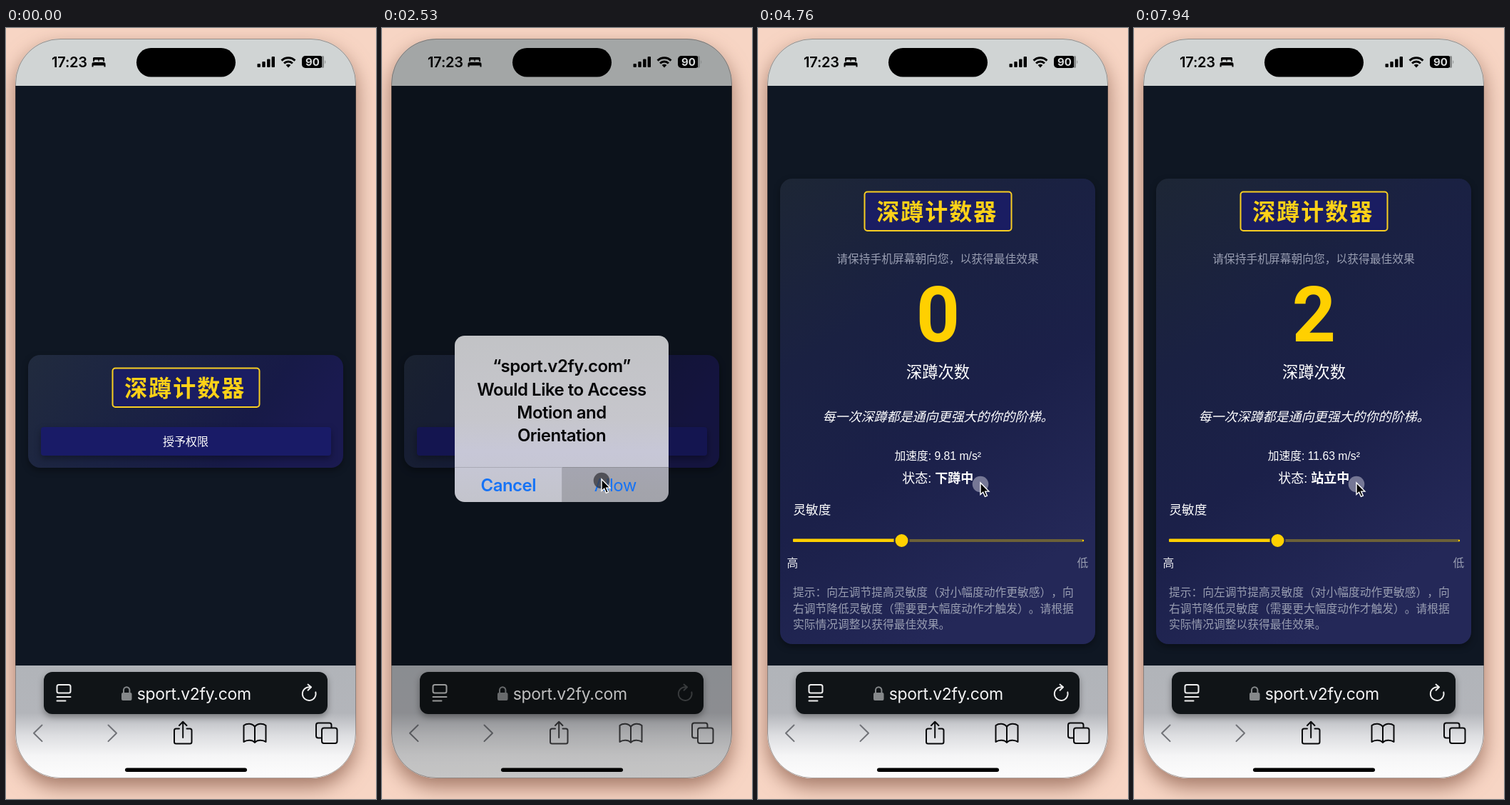
Write an HTML page that moves like this. It is 519 px wide and 1080 px high and loops after 8000 ms.

```html
<!DOCTYPE html>
<html lang="zh-CN">
<head>
<meta charset="utf-8">
<title>深蹲计数器</title>
<style>
  html, body { margin: 0; width: 100%; height: 100%; overflow: hidden; background: #f7d5c4; }
  svg { display: block; width: 100vw; height: 100vh; text-spacing-trim: space-all; }
  filter { color-interpolation-filters: sRGB; }
  text { font-family: "Liberation Sans", "Noto Sans CJK SC", "Noto Sans CJK", sans-serif; fill: #fff; font-size: 15.75px; }
  .ui { font-family: Inter, sans-serif; }
  .mid { text-anchor: middle; }
  .muted { fill: #999eb2; }
  .line { fill: none; stroke-linecap: round; stroke-linejoin: round; }
  #count { font: 700 107px Roboto, sans-serif; fill: #ffd000; }
  #alert text { font-size: 24px; letter-spacing: -.5px; fill: #050507; font-weight: 600; text-anchor: middle; }
  #alert text.action { fill: #1673f5; }
</style>
</head>
<body>
<svg viewBox="0 0 519 1080" preserveAspectRatio="none">
  <defs>
    <clipPath id="screen"><rect x="13" y="15" width="478" height="1036" rx="63"/></clipPath>
    <clipPath id="alertShape"><rect x="102" y="431" width="300" height="233" rx="14"/></clipPath>
    <linearGradient id="smallCard" x1="0" y1="0" x2="1" y2=".25">
      <stop stop-color="#212b3e"/><stop offset=".4" stop-color="#1b2343"/>
      <stop offset=".8" stop-color="#171a47"/><stop offset="1" stop-color="#1a1a50"/>
    </linearGradient>
    <linearGradient id="bigCard" x1="0" y1="0" x2=".45" y2="1">
      <stop stop-color="#1d2635"/><stop offset=".35" stop-color="#1a2142"/>
      <stop offset=".65" stop-color="#1b2049"/><stop offset="1" stop-color="#242858"/>
    </linearGradient>
    <linearGradient id="toolbar" x1="0" y1="0" x2="0" y2="1">
      <stop stop-color="#b1b4b9"/><stop offset=".42" stop-color="#b3b5ba"/>
      <stop offset=".62" stop-color="#dddee1"/><stop offset=".8" stop-color="#f5f5f6"/><stop offset="1" stop-color="#fdfdfd"/>
    </linearGradient>
    <linearGradient id="alertFill" x1="0" y1="0" x2="0" y2="1">
      <stop stop-color="#c2c3c6"/><stop offset=".5" stop-color="#c6c6cc"/>
      <stop offset=".7" stop-color="#c7c7d7"/><stop offset="1" stop-color="#c3c4cc"/>
    </linearGradient>
    <filter id="phoneShadow" x="-20%" y="-20%" width="140%" height="140%">
      <feDropShadow dx="0" dy="12" stdDeviation="14" flood-color="#6b3a28" flood-opacity=".6"/>
    </filter>
    <filter id="softShadow" x="-20%" y="-30%" width="140%" height="170%">
      <feDropShadow dx="0" dy="4" stdDeviation="5" flood-color="#000" flood-opacity=".35"/>
    </filter>
  </defs>

  <rect width="519" height="1080" fill="#f7d5c4"/>
  <rect x="13" y="15" width="478" height="1036" rx="63" fill="#d0d4d4" filter="url(#phoneShadow)"/>

  <g clip-path="url(#screen)">
    <rect x="13" y="15" width="478" height="67" fill="#d0d4d4"/>
    <rect x="13" y="81" width="478" height="812" fill="#0f1723"/>

    <g id="intro">
      <rect x="31" y="458" width="442" height="158" rx="17" fill="url(#smallCard)" filter="url(#softShadow)"/>
      <rect x="49" y="559" width="407" height="40" rx="4" fill="#191b67" filter="url(#softShadow)"/>
      <text class="mid" x="252" y="584.5" style="font-size:16px;font-weight:500">授予权限</text>
    </g>

    <g id="counter">
      <rect x="31" y="211" width="442" height="652" rx="17" fill="url(#bigCard)" filter="url(#softShadow)"/>
      <text class="mid muted" x="252" y="329">请保持手机屏幕朝向您，以获得最佳效果</text>
      <text id="count" class="mid" x="252.5" y="439"></text>
      <text class="mid" x="252.5" y="490" style="font-size:22.3px;font-weight:500">深蹲次数</text>
      <text class="mid" x="252.5" y="551" style="font-size:18px;font-style:italic">每一次深蹲都是通向更强大的你的阶梯。</text>
      <text id="accel" class="mid" x="252.3" y="605"></text>
      <text class="mid" x="252.3" y="636.5" style="font-size:18px">状态: <tspan id="state" font-weight="700"></tspan></text>
      <text x="49.5" y="681" style="font-size:17.6px">灵敏度</text>
      <rect x="49" y="716" width="408" height="4" rx="2" fill="#6b6038"/>
      <rect x="49" y="715.5" width="152" height="4.5" rx="1" fill="#ffd000"/>
      <circle cx="456" cy="718" r="1.2" fill="#ffd000"/>
      <circle cx="201.5" cy="718" r="10" fill="#ffd000" stroke="#20244f" stroke-width="2"/>
      <text x="40.5" y="755" fill-opacity=".9">高</text>
      <text class="muted" x="447.5" y="755">低</text>
      <text class="muted" x="49" y="796">提示：向左调节提高灵敏度（对小幅度动作更敏感），向</text>
      <text class="muted" x="49" y="818.5">右调节降低灵敏度（需要更大幅度动作才触发）。请根据</text>
      <text class="muted" x="49" y="841">实际情况调整以获得最佳效果。</text>
    </g>

    <g id="heading">
      <rect x="149.5" y="476.5" width="206" height="54.5" rx="4" fill="#1a1d62" stroke="#f8ce22" stroke-width="2"/>
      <text x="166.3" y="516" style="font-size:32px;font-weight:700;letter-spacing:2px;fill:#fdd118">深蹲计数器</text>
    </g>

    <rect x="13" y="893" width="478" height="158" fill="url(#toolbar)"/>
    <rect x="53" y="902" width="398" height="59" rx="12" fill="#101417" filter="url(#softShadow)"/>
    <text class="ui mid" x="263.8" y="940.5" style="font-size:23px;letter-spacing:-.3px;fill:#f4f4f5">sport.v2fy.com</text>
    <g fill="#85888a">
      <rect x="162" y="931" width="14.5" height="11" rx="2"/>
      <path d="M165 931v-3.5a4.2 4.2 0 0 1 8.4 0v3.5" fill="none" stroke="#85888a" stroke-width="2"/>
    </g>
    <g id="pageIcon" class="line" stroke="#f0f0f0" stroke-width="2">
      <rect x="71.5" y="920" width="19" height="11.5" rx="2.5"/>
      <path d="M71.5 937h19M71.5 942.5h12"/>
    </g>
    <g id="reload" class="line" stroke="#f0f0f0" stroke-width="1.9">
      <path d="M434.3 930.3a9.4 9.4 0 1 1-9.3-7.1h2.5M423.5 919.5l4.6 3.8-4.6 4.4"/>
    </g>
    <g class="line" stroke="#717378" stroke-width="2">
      <path d="M50.5 976.5l-11.5 11.3 11.5 11.3M143.5 976.5l11.5 11.3-11.5 11.3"/>
    </g>
    <g id="tools" class="line" stroke="#08090b" stroke-width="2">
      <path d="M243 981.5h-4.5a2.5 2.5 0 0 0-2.5 2.5v16a2.5 2.5 0 0 0 2.5 2.5h19.5a2.5 2.5 0 0 0 2.5-2.5v-16a2.5 2.5 0 0 0-2.5-2.5h-4.5M248.2 994v-22M243 977l5.2-5.3 5.2 5.3"/>
      <path d="M349 979c-3-5-11-5.5-15.5-2v23c4.5-3.5 12.5-3 15.5 1 3-4 11-4.5 15.5-1v-23c-4.5-3.5-12.5-3-15.5 2v22"/>
      <path d="M442 994.5h-4a3 3 0 0 1-3-3v-15a3 3 0 0 1 3-3h15.5a3 3 0 0 1 3 3v3.5"/>
      <rect x="443" y="980.5" width="21.5" height="21.5" rx="3"/>
    </g>

    <rect id="dim" x="13" y="15" width="478" height="1036"/>

    <g id="statusBar">
      <rect x="183" y="28" width="139" height="40.5" rx="20.2"/>
      <text class="ui" x="64" y="55" style="font-size:20px;font-weight:600;letter-spacing:-.2px;fill:#000">17:23</text>
      <path d="M122 47v-4.5q0-1.5 1.5-1.5h13q1.5 0 1.5 1.5V47h-2v-1.5q0-1-1-1h-3.5q-1 0-1 1V47h-1v-1.5q0-1-1-1H125q-1 0-1 1V47zM120.5 54.5v-4q0-2.5 2.5-2.5h14q2.5 0 2.5 2.5v4h-2v-2h-15v2z"/>
      <rect x="352.5" y="50" width="4.4" height="5" rx="1"/>
      <rect x="359.3" y="47" width="4.4" height="8" rx="1"/>
      <rect x="366.1" y="43.5" width="4.4" height="11.5" rx="1"/>
      <rect x="372.6" y="40" width="4.4" height="15" rx="1"/>
      <g fill="none" stroke="#000" stroke-width="3">
        <path d="M386.6 45.6a13.3 13.3 0 0 1 18.8 0M390.1 49.5a8.3 8.3 0 0 1 11.8 0"/>
      </g>
      <path d="M396 55.5l-3.3-3.4a4.7 4.7 0 0 1 6.6 0z"/>
      <rect x="415" y="39" width="30" height="17" rx="5"/>
      <rect x="443" y="39" width="3" height="17" rx="2" fill="#858888"/>
      <path d="M447.3 45q2 2.5 0 5.5z" fill="#858888"/>
      <text class="ui mid" x="430" y="53" style="font-size:15px;font-weight:700;fill:#d8dbdb">90</text>
    </g>
    <rect x="167" y="1036.5" width="171" height="5.5" rx="2.75"/>
  </g>
  <rect x="13.5" y="15.5" width="477" height="1035" rx="62.5" fill="none" stroke="#5c4a42" stroke-opacity=".5"/>

  <g id="alert">
    <g id="alertPlate" clip-path="url(#alertShape)">
      <rect x="102" y="431" width="300" height="233" fill="url(#alertFill)"/>
      <rect id="pressed" x="253" y="615" width="149" height="49" fill="#000" fill-opacity=".17"/>
      <path d="M102 615.5h300M252.5 615v49" stroke="#000" stroke-opacity=".14"/>
    </g>
    <g id="alertLabels">
      <text class="ui" x="252" y="482.5">“sport.v2fy.com”</text>
      <text class="ui" x="252" y="515">Would Like to Access</text>
      <text class="ui" x="252" y="547.2">Motion and</text>
      <text class="ui" x="252" y="579.4">Orientation</text>
      <text class="ui action" x="177.3" y="648.5">Cancel</text>
      <text class="ui action" x="327.3" y="648.5" style="font-weight:400">Allow</text>
    </g>
  </g>

  <g id="cursor">
    <circle id="touch" r="11.3"/>
    <path d="M0-2v16.5l3.7-3.4 2.7 6.3 3-1.3-2.7-6h5.2z" stroke="#fff" stroke-width="1.4"/>
  </g>
</svg>
<script>
const LOOP = 8000, FPS = 17;
const ALERT_IN = 1708, ALERT_OUT = 2800, PANEL_AT = 3470;
const $ = id => document.getElementById(id);
const show = (id, on) => $(id).setAttribute('visibility', on ? 'visible' : 'hidden');
const fade = (id, opacity) => $(id).setAttribute('opacity', opacity);
const smooth = u => u * u * (3 - 2 * u);
const settle = (t, start) => t < start ? 0 : 1 - Math.exp(-(t - start) / 124);

// Interpolates rows of [position, value, ...]; returns the values.
function sample(rows, at, ease = u => u) {
  const i = rows.findIndex(row => row[0] > at);
  if (i < 0) return rows[rows.length - 1].slice(1);
  if (i === 0) return rows[0].slice(1);
  const [a, b] = [rows[i - 1], rows[i]];
  const u = ease((at - a[0]) / (b[0] - a[0]));
  return a.slice(1).map((v, k) => v + (b[k + 1] - v) * u);
}

const cursorPath = [[1000, 426, 592], [1350, 229, 567], [1580, 245, 583],
  [2050, 245, 583], [2430, 308, 634], [2560, 308, 634], [2800, 312, 639]];

// Sensor readings in m/s², by tick
const readings = [[59, 9.8], [71, 9.78], [74, 8.62], [78, 10.94], [81, 9.81], [84, 8.87],
  [87, 10.31], [92, 9.64], [97, 10.12], [102, 9.92], [105, 8.43], [109, 11.27], [112, 9.71],
  [118, 9.38], [123, 9.88], [127, 9.52], [131, 8.26], [135, 11.63]];

function touchColor(t) {
  if ((t > 1560 && t < 2000) || (t > 2600 && t < 3400)) return '#f20000';
  return t >= 2000 && t <= 2600 ? 'rgba(58,58,64,.78)' : 'rgba(190,190,208,.55)';
}

function render(t) {
  const tick = Math.floor((t + 5) * FPS / 1000);
  const entered = settle(t, ALERT_IN);
  const shown = entered * (1 - settle(t, ALERT_OUT));
  const panel = t >= PANEL_AT;

  show('intro', !panel);
  show('counter', panel);
  $('heading').setAttribute('transform', `translate(0 ${panel ? -247 : 0})`);

  const squatting = (tick >= 74 && tick < 83) || (tick >= 103 && tick < 110);
  $('count').textContent = tick < 83 ? 0 : tick < 110 ? 1 : 2;
  $('accel').textContent = `加速度: ${sample(readings, tick)[0].toFixed(2)} m/s²`;
  $('state').textContent = squatting ? '下蹲中' : '站立中';

  fade('dim', .22 * shown);
  fade('reload', 1 - .75 * shown);
  fade('pageIcon', 1 - .2 * shown);
  fade('tools', 1 - .25 * shown);

  const scale = 1.2 - .2 * entered;
  $('alert').setAttribute('transform', `translate(252 547.5) scale(${scale}) translate(-252 -547.5)`);
  show('alert', !panel);
  fade('alertPlate', shown);
  fade('alertLabels', shown);
  fade('pressed', t > 2480 && t < ALERT_OUT ? 1 : 0);

  show('cursor', t >= 1000);
  $('cursor').setAttribute('transform', `translate(${sample(cursorPath, t, smooth)})`);
  $('touch').setAttribute('fill', touchColor(t));
}

const start = performance.now();
function frame() {
  render((performance.now() - start) % LOOP);
  requestAnimationFrame(frame);
}
frame();
</script>
</body>
</html>
```
